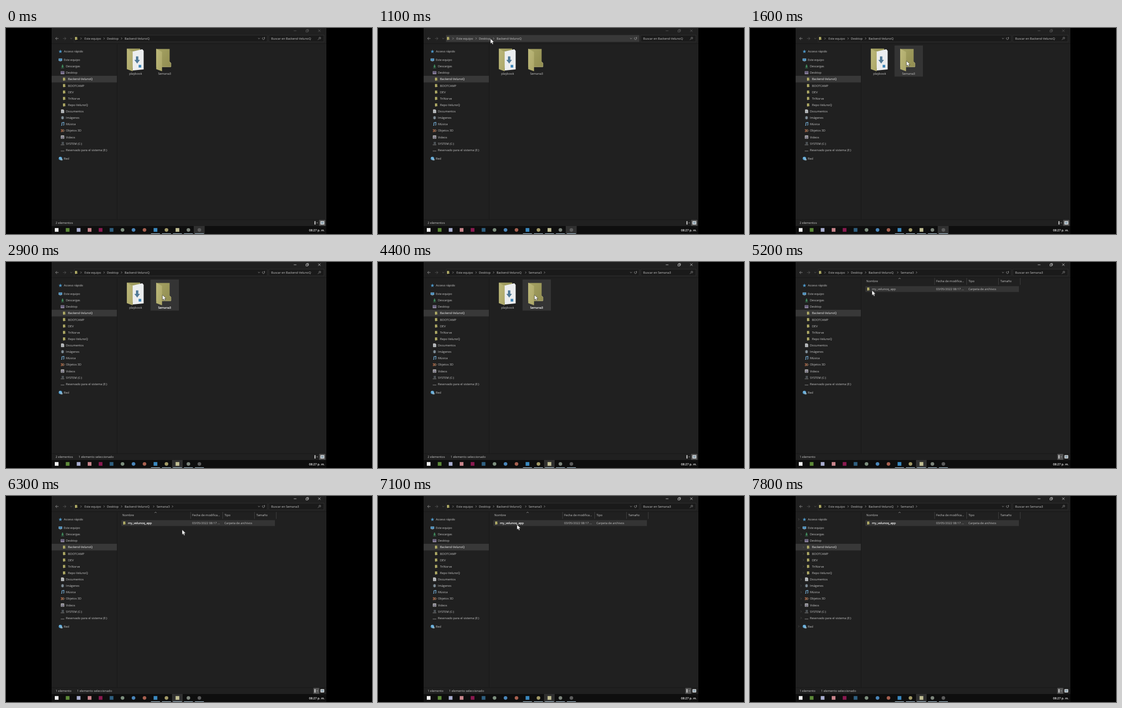
These frames come from a looping animation (690 by 388 pixels, 8000 ms). An HTML page:

```html
<!DOCTYPE html>
<html lang="es">
<head>
<meta charset="utf-8">
<title>Explorador de archivos</title>
<style>
html, body { margin: 0; width: 100%; height: 100%; overflow: hidden; background: #000; }
svg { display: block; width: 690px; height: 388px; }
text { font: 5.7px "Open Sans", "Noto Sans", sans-serif; fill: #c6c6c6; text-rendering: geometricPrecision; }
#side text { font-size: 5.6px; }
.white { fill: #f4f4f4; }
.clock { font-weight: 600; }
.mid { text-anchor: middle; }
.line { fill: none; stroke: #a8a8a8; stroke-width: .7; }
.dim { stroke: #666; }
.lit { stroke: #e2e2e2; }
.rule { stroke: #3c3c3c; stroke-width: 1; }
.seam { fill: none; stroke: #191919; stroke-width: 1; }
.field { fill: #1a1a1a; stroke: #2c2c2c; }

/* every state shares one 8 s clock and changes abruptly */
.t { animation: 8s step-end infinite; }
.idle { animation-name: idle; }
.active { animation-name: active; }
.barover { animation-name: barover; }
.parent { animation-name: parent; }
.child { animation-name: child; }
.icons { animation-name: icons; }
.list { animation-name: list; }
.over { animation-name: over; }
.rowover { animation-name: rowover; }
.picked { animation-name: picked; }
.tree { animation-name: tree; }
.cursor { animation-name: cursor; }
@keyframes idle { 0% { opacity: 1 } 35%, 100% { opacity: 0 } }
@keyframes active { 0% { opacity: 0 } 35%, 100% { opacity: 1 } }
@keyframes barover { 0% { opacity: 0 } 13.75% { opacity: 1 } 15%, 100% { opacity: 0 } }
@keyframes parent { 0% { opacity: 1 } 55%, 100% { opacity: 0 } }
@keyframes child { 0% { opacity: 0 } 55%, 100% { opacity: 1 } }
@keyframes icons { 0% { opacity: 1 } 56.25%, 100% { opacity: 0 } }
@keyframes list { 0% { opacity: 0 } 56.25%, 100% { opacity: 1 } }
@keyframes over { 0% { opacity: 0 } 17.5%, 100% { opacity: 1 } }
@keyframes rowover { 0% { opacity: 0 } 62.5%, 100% { opacity: 1 } }
@keyframes picked { 0% { opacity: 0 } 72.5%, 100% { opacity: 1 } }
@keyframes tree { 0% { opacity: 0 } 95%, 100% { opacity: 1 } }
@keyframes cursor {
  0% { transform: translate(-20px, -20px) }
  12.5% { transform: translate(96px, 15px) }
  13.75% { transform: translate(212px, 20px) }
  15% { transform: translate(240px, 33px) }
  16.25% { transform: translate(264px, 46px) }
  17.5% { transform: translate(282px, 56px) }
  18.75% { transform: translate(292px, 61px) }
  20% { transform: translate(295px, 62px) }
  60% { transform: translate(285px, 61px) }
  61.25% { transform: translate(262px, 58px) }
  62.5% { transform: translate(243px, 56px) }
  63.75% { transform: translate(234px, 54px) }
  65% { transform: translate(230px, 53.5px) }
  66.25% { transform: translate(230px, 53px) }
  76.25% { transform: translate(252px, 56px) }
  77.5% { transform: translate(300px, 61px) }
  78.75% { transform: translate(332px, 63.5px) }
  80% { transform: translate(331px, 70px) }
  81.25% { transform: translate(324px, 75px) }
  82.5% { transform: translate(306px, 72px) }
  83.75% { transform: translate(285px, 65px) }
  85% { transform: translate(270px, 58px) }
  86.25% { transform: translate(263px, 54.5px) }
  87.5% { transform: translate(262.5px, 54px) }
  88.75% { transform: translate(262px, 54px) }
  93.75% { transform: translate(238px, 66px) }
  95% { transform: translate(182px, 94px) }
  96.25% { transform: translate(112px, 122px) }
  97.5%, 100% { transform: translate(-20px, -20px) }
}
</style>
</head>
<body>
<svg viewBox="0 0 690 388">
  <defs>
    <linearGradient id="back" x2="1" y2="1"><stop stop-color="#a5a263"/><stop offset="1" stop-color="#918d51"/></linearGradient>
    <linearGradient id="flap" x2="1" y2="1"><stop stop-color="#bdb97b"/><stop offset="1" stop-color="#aba667"/></linearGradient>
    <path id="next" class="line" d="M-1-1.8L.8 0-1 1.8"/>
    <path id="down" class="line" d="M-1.8-1L0 .8 1.8-1"/>
    <path id="buttons" d="M542.5 5.2H547.5M565.5 4H569V7.5H565.5ZM567 4V2.8H570.3V6.2H569M588.5 2.8L593 7.3M593 2.8L588.5 7.3"/>
    <path id="cover" d="M0 0L11 6V42.5L0 38.5Z" fill="url(#flap)"/>
    <!-- small icons, centred on 0,0 -->
    <g id="folder"><path d="M-2.3-2.9H1.7V.6L2.2 1V2.4H-2.3Z" fill="#9f9b58"/><path d="M-2.3-2.9L-.3-2V3.2L-2.3 2.6Z" fill="#bdb873"/></g>
    <path id="star" d="M0-3.4L.9-1 3.4-.9 1.4.8 2.1 3.2 0 1.9-2.4 3.3-1.5.8-3.4-.9-.9-1Z" fill="#4b93c4"/>
    <g id="pc"><path d="M-3.4-2.6H3.4V1.9H-3.4Z" fill="#86b4d2"/><path d="M-2.8-2H2.8V1.3H-2.8Z" fill="#4a8fbe"/><path d="M-1.8 2.4H1.8V3.1H-1.8Z" fill="#93a4ae"/></g>
    <path id="get" d="M-.8-3.2H.8V-.3H2.6L0 2.3-2.6-.3H-.8ZM-2.8 2.6H2.8V3.3H-2.8Z" fill="#469a66"/>
    <g id="desk"><path d="M-3.5-2.8H3.5V2.8H-3.5Z" fill="#978ea5"/><path d="M-2.9-2.2H2.9V1.2H-2.9Z" fill="#675f7e"/></g>
    <g id="doc"><path d="M-2.8-3.4H1.4L3-2V3.4H-2.8Z" fill="#cfcfcf"/><path d="M-1.6-1.2H1.7M-1.6.3H1.7M-1.6 1.8H1.7" stroke="#798995" stroke-width=".7"/></g>
    <path id="pic" d="M0-3V3M-2.6-1.5L2.6 1.5M-2.6 1.5L2.6-1.5" stroke="#93a4af" stroke-width="1.5"/>
    <path id="note" d="M-1.2 2.2V-2.8L2.6-3.4V1.6M-1.2 2.2H-2.6M2.6 1.6H1.2" fill="none" stroke="#72a9cf" stroke-width="1.2"/>
    <g id="cube"><path d="M-3.3-1.9H-.6V2H-3.3M-2.8 0H-.6" fill="none" stroke="#c4754f" stroke-width="1"/><path d="M.8-1.9H2L3.2-.8V.9L2 2H.8Z" fill="none" stroke="#a98365" stroke-width="1"/></g>
    <g id="film"><path d="M-3.1-3H3.1V3H-3.1Z" fill="#c9c9c9"/><path d="M-1.9-1.4H1.9V2.2H-1.9Z" fill="#4d4860"/><path d="M-.7-.8L1.1.3-.7 1.4Z" fill="#fff"/></g>
    <g id="disk"><path d="M-3.4 2H3.4V2.9H-3.4Z" fill="#939393"/><path d="M-1.4-2.8H.2V-1.2H-1.4ZM.8-2.8H2.4V-1.2H.8ZM-1.4-.7H.2V.9H-1.4ZM.8-.7H2.4V.9H.8Z" fill="#6c777d"/></g>
    <path id="drive" d="M-3.4 1.6H3.4V2.5H-3.4Z" fill="#8f8f8f"/>
    <g id="net"><circle r="3.2" fill="#58a3d3"/><path d="M-2.4-1.8Q1-1.4 2.4 2.2M1 1.4H3.6V3.4H1Z" fill="none" stroke="#b5d8ea" stroke-width=".8"/></g>
  </defs>

  <rect x="86" width="518" height="388" fill="#202020"/>
  <path class="seam" d="M86 29.5H604M209.5 30V361M86 361H604"/>

  <!-- window buttons -->
  <g class="t idle"><use href="#buttons" class="line dim"/></g>
  <g class="t active"><use href="#buttons" class="line lit"/></g>

  <!-- address and search -->
  <rect class="field" x="128.5" y="13.5" width="364" height="12.5"/>
  <rect class="t barover" x="128.5" y="13.5" width="364" height="12.5" fill="#383838" opacity="0"/>
  <rect class="field" x="495.5" y="13.5" width="104" height="12.5"/>
  <path class="line" d="M99 19.8H93.5M96 17.2L93.4 19.8 96 22.4"/>
  <path class="line dim" d="M107.5 19.8H113M110.5 17.2L113.1 19.8 110.5 22.4"/>
  <use href="#down" x="123" y="19.8" opacity=".6"/>
  <use href="#folder" x="132.6" y="19.6"/>
  <use href="#next" x="141.5" y="19.8"/><text x="148" y="21.9">Este equipo</text>
  <use href="#next" x="185" y="19.8"/><text x="190.3" y="21.9">Desktop</text>
  <use href="#next" x="218" y="19.8"/><text x="223.5" y="21.9">Backend-VelunoQ</text>
  <g class="t child">
    <use href="#next" x="278.5" y="19.8"/><text x="284" y="21.9">Semana3</text>
    <use href="#next" x="314" y="19.8"/>
    <text x="500" y="21.9">Buscar en Semana3</text>
  </g>
  <text class="t parent" x="500" y="21.9">Buscar en Backend-VelunoQ</text>
  <use href="#down" x="477" y="19.8"/>
  <path class="line" d="M487.1 18.3A2.2 2.2 0 1 1 484.4 17.7M487.4 16.8V18.7H485.6"/>
  <path class="line" d="M590.1 19.2A1.6 1.6 0 1 1 591.5 20.5L590.4 19.4M590.3 20L588 22.4"/>

  <!-- sidebar -->
  <rect x="86" y="90" width="123" height="12.5" fill="#383838"/>
  <g id="side"></g>
  <g id="arrows" class="t tree" opacity="0"></g>

  <!-- icon view -->
  <g class="t icons">
    <rect class="t over" x="272.5" y="33" width="53.5" height="58.5" fill="#343434"/>
    <path d="M228 38.8H253V75H228Z" fill="url(#back)"/>
    <path d="M236 45L257 40 259.5 43V78L239 80Z" fill="#eceeef"/>
    <path d="M245 53.5H249.5V60H252.5L247.3 67 242 60H245Z" fill="#517a97"/>
    <rect x="250" y="69.5" width="5" height="5" fill="#3f86b8"/>
    <use href="#cover" x="227.8" y="39"/>
    <path d="M283.2 39.5H308.5V63.5L311 66V73.5H283.2Z" fill="url(#back)"/>
    <path d="M308.5 63.5L311 66V73H294" fill="none" stroke="#bdb986" stroke-width=".7"/>
    <use href="#cover" x="283.2" y="39"/>
    <text class="mid" x="244.3" y="88.2">playbook</text>
    <text class="mid" x="299" y="88.2">Semana3</text>
    <text class="mid white t active" x="299" y="88.2">Semana3</text>
    <text x="93.5" y="369.3">2 elementos</text>
    <text class="t active" x="137" y="369.3">1 elemento seleccionado</text>
    <rect x="590.5" y="361.5" width="11.5" height="11" fill="#555"/>
  </g>

  <!-- detail view -->
  <g class="t list" opacity="0">
    <path class="rule" d="M348 30V43M408.5 30V43M468.5 30V43M509.5 30V43"/>
    <path class="line" d="M280 31.8L282 30.2 284 31.8"/>
    <text x="219.3" y="38.3">Nombre</text>
    <text x="351" y="38.3">Fecha de modifica...</text>
    <text x="411.7" y="38.3">Tipo</text>
    <text x="472" y="38.3">Tamaño</text>
    <rect class="t rowover" x="217.5" y="45.5" width="289.5" height="11" fill="#343434"/>
    <use href="#folder" x="223.4" y="50.8"/>
    <text x="230" y="53">my_velunoq_app</text>
    <text class="white t picked" x="230" y="53">my_velunoq_app</text>
    <text x="351" y="53">03/05/2022 08:17 ...</text>
    <text x="411.7" y="53">Carpeta de archivos</text>
    <text x="93.5" y="369.3">1 elemento</text>
    <text class="t picked" x="134" y="369.3">1 elemento seleccionado</text>
    <rect x="579.5" y="361.5" width="11" height="11" fill="#555"/>
  </g>
  <path d="M582.5 363.8V370.2" stroke="#eee" stroke-width="1.6"/>
  <path d="M585.5 367H588" stroke="#aaa" stroke-width=".9"/>
  <path d="M593.3 364.3H599.3V369.5H593.3Z" fill="#8fa3b0" stroke="#eee" stroke-width="1"/>

  <!-- taskbar -->
  <rect x="86" y="373" width="518" height="15" fill="#0e0e0e"/>
  <rect class="t idle" x="354" y="373" width="20.5" height="15" fill="#303030"/>
  <rect class="t active" x="313" y="373" width="20" height="15" fill="#303030"/>
  <g id="tasks"></g>
  <text class="white clock" x="571.3" y="382.5">08:27 p. m.</text>

  <path class="t cursor" d="M0 0V9.4L2.2 7.4 3.7 10.7 5.4 9.9 3.9 6.8H7Z" fill="#fff" stroke="#111" stroke-width=".5"/>
</svg>
<script>
const put = (id, html) => document.getElementById(id).innerHTML = html;

// icon, label, depth (a depth-0 row sits at the margin)
const rows = [
  ["pc", "Este equipo", 0], ["get", "Descargas", 1], ["desk", "Desktop", 1],
  ["folder", "Backend-VelunoQ", 2], ["folder", "BOOTCAMP", 2], ["folder", "DEV", 2],
  ["folder", "TriNorve", 2], ["folder", "Repo-VelunoQ", 2],
  ["doc", "Documentos", 1], ["pic", "Imágenes", 1], ["note", "Música", 1],
  ["cube", "Objetos 3D", 1], ["film", "Videos", 1],
  ["disk", "SYSTEM (C:)", 1], ["drive", "Reservado para el sistema (E:)", 1]
].map(([icon, label, depth], i) => ({ icon, label, depth, y: 60 + i * 12.12 }));
rows.push({ icon: "star", label: "Acceso rápido", depth: 0, y: 44 },
          { icon: "net", label: "Red", depth: 0, y: 245.6 });

put("side", rows.map(({ icon, label, depth, y }) => {
  const white = label.startsWith("Backend") ? "white" : "";
  return `<use href="#${icon}" x="${[102.6, 106.6, 110][depth]}" y="${y}"/>
    <text class="${white}" x="${109 + depth * 4}" y="${y + 2.1}">${label}</text>`;
}).join(""));

put("arrows", rows.map(({ label, depth, y }) => {
  const open = label === "Este equipo" || label === "Desktop";
  return `<use href="#${open ? "down" : "next"}" x="${92 + depth * 4.3}" y="${y}" opacity=".4"/>`;
}).join(""));

// one plain mark per taskbar slot
const marks = [
  ["s", "#f2f2f2"], ["s", "#5d8a38"], ["s", "#a9aed0"], ["s", "#c9858c"], ["s", "#8a1a50"],
  ["s", "#2f5f80"], ["c", "#7d8f7e"], ["c", "#4a86ba"], ["c", "#a8604f"], ["s", "#3a89c0"],
  ["c", "#a39a66"], ["s", "#c2bf94"], ["c", "#7d857c"], ["c", "#5c5c5c"]
];
put("tasks", marks.map(([shape, color], i) => {
  const x = 95.5 + i * 20.7;
  const mark = shape === "c"
    ? `<circle cx="${x}" cy="380.3" r="3.4" fill="${color}"/>`
    : `<rect x="${x - 3.5}" y="376.8" width="7" height="7" fill="${color}"/>`;
  const bar = i > 8 ? `<path d="M${x - 8.5} 387.4H${x + 8.5}" stroke="#9db4c2" stroke-width="1.2"/>` : "";
  return mark + bar;
}).join(""));
</script>
</body>
</html>
```
